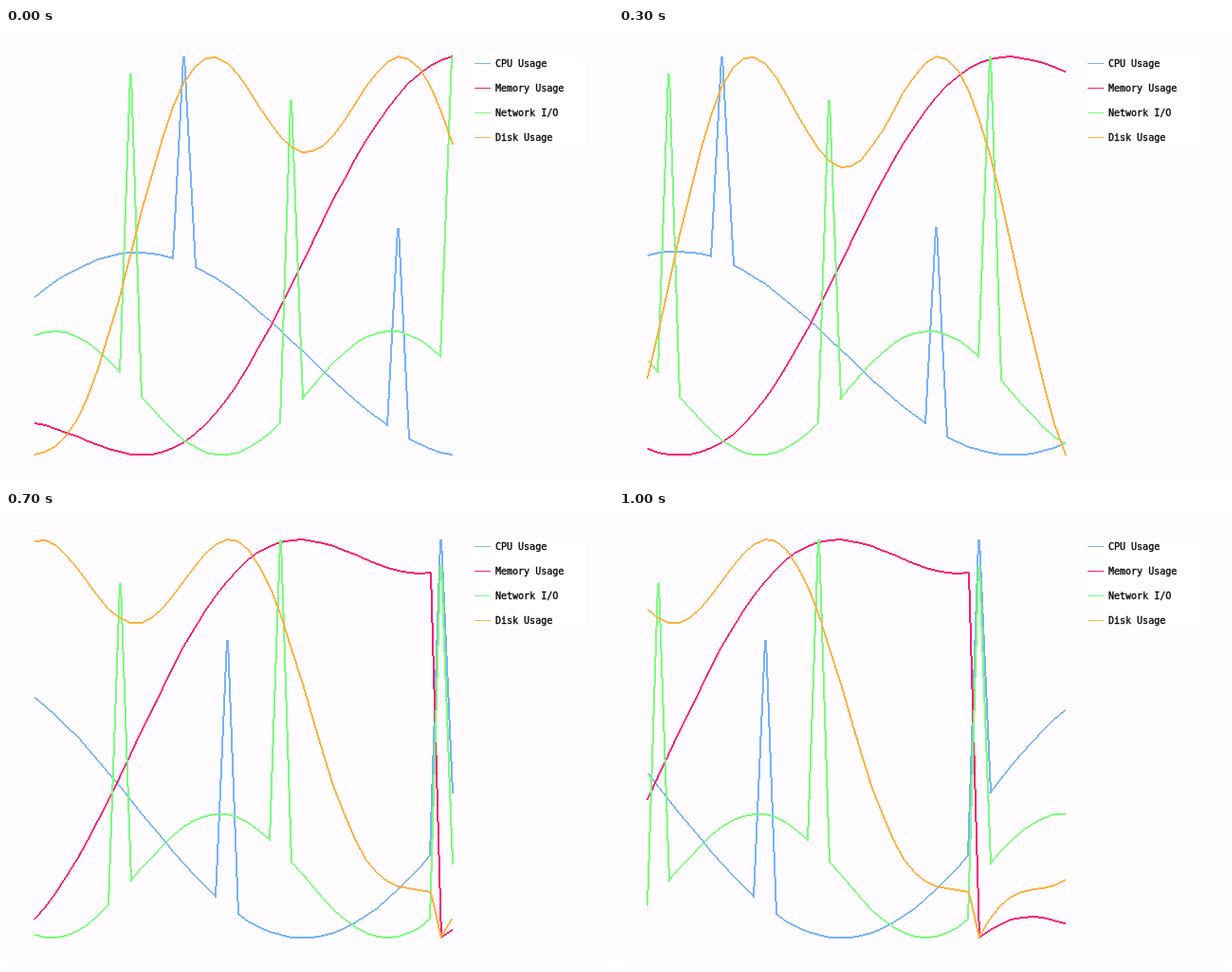
Write an HTML page with a canvas that moves like this. It is 640 by 480 pixels and loops after 1.1 s.

```html
<!DOCTYPE html>
<html>
<head>
<meta charset="utf-8">
<style>
  html, body { margin: 0; width: 100%; height: 100%; overflow: hidden; background: #fefcff; }
  canvas, svg { position: absolute; left: 0; top: 0; }
  text { font: 10px "DejaVu Sans Mono", monospace; stroke: #000; stroke-width: .3; }
</style>
</head>
<body>
<canvas id="chart" width="640" height="480"></canvas>
<svg id="legend" width="640" height="480"></svg>
<script>
const { sin, cos, min, max, abs, floor, ceil, round } = Math;
const SHOWN = 40, CYCLE = 60, LOOP = 1100, TICK = 100;
const LEFT = 30, TOP = 30, WIDTH = 440, HEIGHT = 420;

const spike = (i, every, size) => i % every ? 0 : size;
const series = [
  { name: 'CPU Usage', color: '#78b2fb', value: i => sin(i * .1) + spike(i, 20, 2) },
  { name: 'Memory Usage', color: '#fd1c74', value: i => i * .1 + cos(i * .15) },
  { name: 'Network I/O', color: '#7bfe7b', value: i => sin(i * .2) + spike(i, 15, 5) },
  { name: 'Disk Usage', color: '#ffb143', value: i => sin(i * .05) + .15 * cos(i * .3) }
];

const ctx = document.getElementById('chart').getContext('2d');
const legend = document.getElementById('legend');

function add(tag, attrs, text = '') {
  const el = document.createElementNS('http://www.w3.org/2000/svg', tag);
  for (const k in attrs) el.setAttribute(k, attrs[k]);
  el.textContent = text;
  legend.append(el);
}

add('rect', { x: 491, y: 28, width: 120, height: 96, fill: '#fff' });
series.forEach((s, n) => {
  const y = 37 + n * 26;
  add('rect', { x: 494, y, width: 17, height: 1, fill: s.color });
  add('text', { x: 516, y: y + 4 }, s.name);
});

// Each series is scaled to the range of its visible window.
function points(value, start) {
  const vals = Array.from({ length: SHOWN }, (_, i) => value((start + i) % CYCLE));
  const lo = min(...vals), hi = max(...vals);
  return vals.map((v, i) => [
    floor(LEFT + i * WIDTH / (SHOWN - 1)),
    TOP + ceil(HEIGHT * (hi - v) / (hi - lo))
  ]);
}

// Hard-edged line, two pixels wide, the second pixel on the left of its direction.
function line([x0, y0], [x1, y1]) {
  const dx = x1 - x0, dy = y1 - y0, steps = max(abs(dx), abs(dy));
  for (let i = 0; i <= steps; i++) {
    const x = round(x0 + dx * i / steps), y = round(y0 + dy * i / steps);
    if (abs(dy) <= dx) ctx.fillRect(x, y - 1, 1, 2);
    else ctx.fillRect(dy > 0 ? x : x - 1, y, 2, 1);
  }
}

let shown = -1;
function draw(now) {
  const tick = floor(now % LOOP / TICK);
  if (tick !== shown) {
    shown = tick;
    ctx.clearRect(0, 0, 640, 480);
    for (const s of series) {
      ctx.fillStyle = s.color;
      const pts = points(s.value, 6 + floor(tick * 7 / 3));
      for (let i = 1; i < SHOWN; i++) line(pts[i - 1], pts[i]);
    }
  }
  requestAnimationFrame(draw);
}
draw(performance.now());
</script>
</body>
</html>
```
